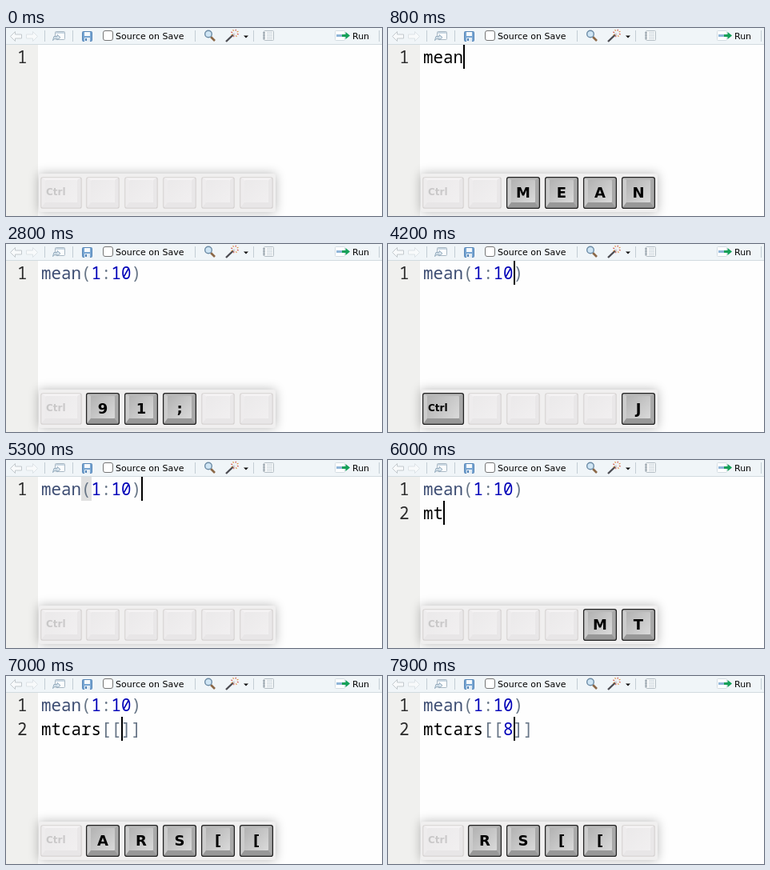
Recreate the animation shown at these times as an HTML page with a canvas. Size 470 by 235 pixels, loop 8000 ms.

```html
<!DOCTYPE html>
<html lang="en">
<head>
<meta charset="utf-8">
<title>Typing in a script editor</title>
<style>
html, body { margin: 0; width: 100%; height: 100%; overflow: hidden; background: #fff; }
canvas { display: block; width: 470px; height: 235px; }
</style>
</head>
<body>
<canvas id="stage"></canvas>
<script>
const W = 470, H = 235, LOOP = 8000;
const CHAR = 12.5, LEFT = 44, TOP = 21, ROW = 30;
const UI = '11px "DejaVu Sans", sans-serif';
const CODE = '20.83px "Noto Sans Mono", monospace';
const KEY = 'bold 18px "DejaVu Sans", sans-serif';
const CTRL = 'bold 12px "DejaVu Sans", sans-serif';

const canvas = document.getElementById('stage');
const g = canvas.getContext('2d');
const dpr = window.devicePixelRatio || 1;
canvas.width = W * dpr;
canvas.height = H * dpr;

// time, lines, caret column, start of the blink cycle (defaults to time)
const edits = [
  [0, [''], 0, -800],
  [500, ['m'], 1], [600, ['me'], 2], [700, ['mea'], 3], [800, ['mean'], 4],
  [1100, ['mean()'], 5], [1300, ['mean(1)'], 6],
  [1700, ['mean(1:)'], 7], [1900, ['mean(1:10)'], 9],
  [4400, ['mean(1:10)'], 10, 4300],
  ...[[5500, '', 0], [5900, 'm', 1], [6000, 'mt', 2], [6100, 'mtc', 3],
    [6200, 'mtca', 4], [6300, 'mtcar', 5], [6700, 'mtcars', 6],
    [6800, 'mtcars[]', 7], [7000, 'mtcars[[]]', 8], [7500, 'mtcars[[8]]', 9]
  ].map(([t, line, col]) => [t, ['mean(1:10)', line], col])
];

// time, labels of the five key slots, Ctrl held
const presses = [
  [0, '     '], [500, '    M'], [600, '   ME'], [700, '  MEA'], [800, ' MEAN'],
  [1100, 'MEAN9'], [1300, 'EAN91'], [1700, 'AN91;'], [1900, '91;10'],
  [2500, '91;1 '], [2800, '91;  '], [3100, '91   '], [3300, '9    '], [3700, '     '],
  [4200, '    J', true], [4900, '     '],
  [5900, '    M'], [6000, '   MT'], [6100, '  MTC'], [6200, ' MTCA'], [6300, 'MTCAR'],
  [6400, 'TCARS'], [6800, 'CARS['], [7000, 'ARS[['], [7300, 'RS[[8'], [7900, 'RS[[ ']
];

const latest = (list, t) => list.findLast(e => e[0] <= t);

function rect(x, y, w, h, color) {
  g.fillStyle = color;
  g.fillRect(x, y, w, h);
}

function poly(points, fill, stroke, width = 1) {
  g.beginPath();
  points.forEach(([x, y], i) => i ? g.lineTo(x, y) : g.moveTo(x, y));
  g.closePath();
  if (fill) { g.fillStyle = fill; g.fill(); }
  if (stroke) { g.strokeStyle = stroke; g.lineWidth = width; g.stroke(); }
}

function line(x1, y1, x2, y2, color, width = 1) {
  g.beginPath();
  g.moveTo(x1, y1);
  g.lineTo(x2, y2);
  g.strokeStyle = color;
  g.lineWidth = width;
  g.stroke();
}

function box(x, y, w, h, r, fill, stroke, width = 1) {
  g.beginPath();
  g.roundRect(x, y, w, h, r);
  if (fill) { g.fillStyle = fill; g.fill(); }
  if (stroke) { g.strokeStyle = stroke; g.lineWidth = width; g.stroke(); }
}

function text(s, x, y, font, color, align = 'left') {
  g.font = font;
  g.fillStyle = color;
  g.textAlign = align;
  g.fillText(s, x, y);
}

function navArrow(x, dir, color) {
  const shape = [[0, 10.5], [6, 4.5], [6, 8], [14, 8], [14, 13], [6, 13], [6, 16.5]];
  poly(shape.map(([dx, y]) => [x + dir * dx, y]), '#f8fafb', color);
}

function toolbar() {
  rect(0, 0, W, 20, '#f0f5f8');
  rect(0, 20, W, 1, '#d2dbe0');
  navArrow(5.5, 1, '#c3c9cd');
  navArrow(39.5, -1, '#dde3e7');
  for (const x of [48, 83, 236, 309, 466]) rect(x, 3, 1, 14, '#c3cdd4');

  // open in new window
  box(61.5, 4.5, 12, 10, 1, '#fbfdfe', '#a9b8c4');
  rect(62, 5, 11, 2, '#c9d7e2');
  poly([[58.5, 15.5], [60, 10.5], [64, 10.5], [64, 8.5], [68, 11.7], [64, 15], [64, 13], [61.5, 13]], '#dce8f0', '#93aabc');

  // save
  box(95.5, 4.5, 12, 12, 1, '#77a5d2', '#5585b6');
  rect(98, 5, 7, 5, '#f5f9fc');
  rect(98, 12, 7, 5, '#e4edf5');
  rect(99, 13, 2, 3, '#5585b6');

  box(121.5, 3.5, 12, 12, 2.5, '#fff', '#767676');
  text('Source on Save', 137, 14, UI, '#000');

  // find
  line(256, 11, 261, 16, '#8b6847', 2.6);
  g.beginPath();
  g.arc(253, 7.5, 4.3, 0, 7);
  g.fillStyle = '#cfe5f4';
  g.fill();
  g.strokeStyle = '#6d8ca6';
  g.lineWidth = 1.4;
  g.stroke();

  // wand
  line(275, 17, 285, 7.5, '#4c4c52', 2.4);
  line(284, 8.5, 286, 6.5, '#d9d9dd', 2.4);
  for (let i = 0; i < 8; i++) {
    const a = i * Math.PI / 4 + 0.3, c = Math.cos(a), s = Math.sin(a);
    line(286 + 3 * c, 6.5 + 3 * s, 286 + 5 * c, 6.5 + 5 * s, i % 2 ? '#e0913f' : '#d4584c', 1.1);
  }
  poly([[297, 9.5], [303, 9.5], [300, 12.5]], '#111');

  // notebook
  box(322.5, 3.5, 12, 12, 1, '#f8fafb', '#b4bec5');
  for (let y = 5; y < 15; y += 2) {
    rect(321, y, 3, 1, '#8f9ba4');
    rect(326, y, 7, 1, '#d0d9df');
  }

  // run
  box(411.5, 3.5, 12, 12, 1, '#fff', '#d3dce2');
  rect(413, 8, 7, 3, '#8fb5d8');
  poly([[420, 8], [424.5, 8], [424.5, 5], [430, 9.5], [424.5, 14], [424.5, 11], [420, 11]], '#14a058');
  text('Run', 433, 14, UI, '#000');
}

function codeLine(s, row) {
  const y = TOP + row * ROW + 23;
  text(row + 1, 26.5, y, CODE, '#2b2b2b', 'right');
  for (const m of s.matchAll(/\d+|\w+|[^\w]/g)) {
    const word = m[0], isCall = s[m.index + word.length] === '(';
    const color = /\d/.test(word) ? '#0000b8'
      : /\W/.test(word) ? '#687687'
      : isCall ? '#3c4c72' : '#000';
    text(word, LEFT + m.index * CHAR, y, CODE, color);
  }
}

function editor(t) {
  const [time, lines, col, start = time] = latest(edits, t);
  rect(0, TOP, 40, H - TOP, '#f0f0ee');
  if (t >= 4500 && t < 5600) rect(94, TOP, 13, ROW, '#e0e0e0');
  lines.forEach(codeLine);
  if (Math.floor((t - start) / 500) % 2 === 0) {
    rect(Math.round(LEFT + col * CHAR), TOP + (lines.length - 1) * ROW, 2, ROW, '#000');
  }
}

function keycap(x, w, label, active) {
  const y = 186, h = 40, l = x + 6, r = x + w - 6, top = y + 4, low = y + h - 8;
  box(x, y, w, h, 2.5, '#fffdfe');
  g.save();
  g.globalAlpha = active ? 1 : 0.15;
  box(x + 0.5, y + 0.5, w - 1, h - 1, 2.5, '#b9b9b9');
  poly([[x + 1, y + 1], [l, top], [l, low], [x + 1, y + h - 1]], '#cccccc');
  poly([[x + w - 1, y + 1], [r, top], [r, low], [x + w - 1, y + h - 1]], '#a9a9a9');
  poly([[x + 1, y + h - 1], [l, low], [r, low], [x + w - 1, y + h - 1]], '#989898');
  const shade = g.createLinearGradient(l, top, r, low);
  shade.addColorStop(0, '#b2b2b2');
  shade.addColorStop(1, '#dadada');
  box(l, top, r - l, low - top, 1.5, shade);
  box(x + 0.6, y + 0.6, w - 1.2, h - 1.2, 2.5, null, active ? '#222' : '#302a20', 1.3);
  if (label === 'Ctrl') text(label, x + 7, 209, CTRL, '#000');
  else if (label !== ' ') text(label, x + w / 2, 212, KEY, '#000', 'center');
  g.restore();
}

function keyboard(t) {
  const [, labels, ctrl] = latest(presses, t);
  g.save();
  g.shadowColor = 'rgba(0,0,0,.28)';
  g.shadowBlur = 13 * dpr;
  box(41, 182, 296, 48, 2, '#f0efef');
  g.restore();
  keycap(43, 52, 'Ctrl', ctrl);
  [...labels].forEach((c, i) => keycap(100 + 48 * i, 42, c, c !== ' '));
}

function draw() {
  const t = performance.now() % LOOP;
  g.setTransform(dpr, 0, 0, dpr, 0, 0);
  rect(0, 0, W, H, '#fefefe');
  editor(t);
  toolbar();
  keyboard(t);
  requestAnimationFrame(draw);
}
draw();
</script>
</body>
</html>
```
